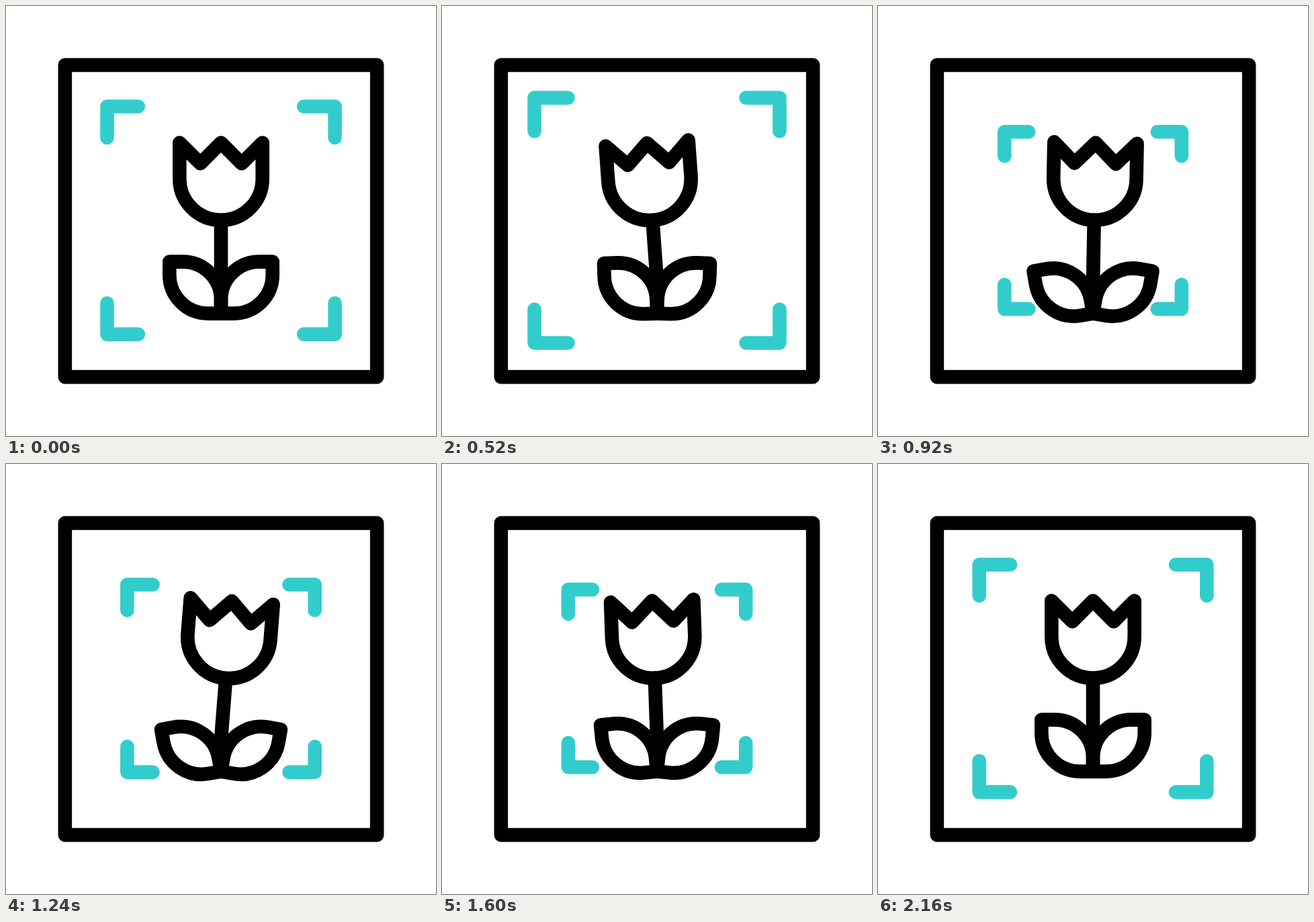
Animation of 640 by 640 pixels, one loop 2.28 s. Source, as an HTML page:

```html
<!DOCTYPE html>
<html lang="en">
<head>
<meta charset="utf-8">
<title>Macro focus</title>
<style>
  html, body { margin: 0; width: 100%; height: 100%; overflow: hidden; background: #fff; }
  svg { display: block; width: 100%; height: 100%; }
  svg * { fill: none; stroke-width: 20.6; stroke-linecap: round; stroke-linejoin: round; }
</style>
</head>
<body>
<svg viewBox="0 0 640 640" stroke="#000">
  <rect x="87.85" y="87.85" width="464.3" height="464.3"/>
  <path id="brackets" stroke="#33cccc"/>
  <!-- The flower is drawn around the foot of its stem. -->
  <g transform="translate(320 457.6)">
    <g id="head">
      <path d="M0-139V-30"/>
      <path d="M-61.7-254.1l30.9 30.9L0-254.1l30.8 30.9 30.9-30.9v53.5a61.7 61.7 0 0 1-123.4 0z"/>
    </g>
    <path class="leaf" d="M76.7-77H57A57 57 0 0 0 0-20V0H19.4A57.3 57.3 0 0 0 76.7-57.3Z"/>
    <g transform="scale(-1 1)">
      <path class="leaf" d="M76.7-77H57A57 57 0 0 0 0-20V0H19.4A57.3 57.3 0 0 0 76.7-57.3Z"/>
    </g>
  </g>
</svg>
<script>
  const LOOP = 2280, STEP = 40, LAST_CHANGE = 2160;

  const brackets = document.getElementById("brackets");
  const head = document.getElementById("head");
  const leaves = document.querySelectorAll(".leaf");

  // Eased progress from 0 to 1 between two times in ms.
  function ease(time, from, to) {
    const u = Math.min(Math.max((time - from) / (to - from), 0), 1);
    return u * u * (3 - 2 * u);
  }

  // Opens a little, snaps shut, hunts for focus, then opens to rest.
  function bracketScale(t) {
    const open = 0.076 * ease(t, 80, 480);
    const shut = 0.326 * ease(t, 560, 810);
    const hunt = 0.1 * ease(t, 810, 1130) - 0.097 * ease(t, 1130, 1450);
    return 1 + open - shut + hunt + 0.247 * ease(t, 1450, 2190);
  }

  // Sways left, right, then slightly left again, in even beats.
  function headAngle(t) {
    const beat = 400, begin = 300, sway = 7.2;
    const swing = n => ease(t, begin + n * beat, begin + (n + 1) * beat);
    return sway * (-swing(0) + 2 * swing(1) - 4 / 3 * swing(2) + swing(3) / 3);
  }

  function leafAngle(t) {
    return 10 * (ease(t, 350, 990) - ease(t, 1300, 1960));
  }

  function bracketPath(scale) {
    const reach = 169.55 * scale, inner = 123.15 * scale;
    let path = "";
    for (const sx of [-1, 1]) {
      for (const sy of [-1, 1]) {
        const x = d => 320 + sx * d, y = d => 319.05 + sy * d;
        path += `M${x(inner)} ${y(reach)}H${x(reach)}V${y(inner)}`;
      }
    }
    return path;
  }

  function draw(now) {
    const time = Math.min(Math.floor((now % LOOP) / STEP) * STEP, LAST_CHANGE);
    brackets.setAttribute("d", bracketPath(bracketScale(time)));
    head.setAttribute("transform", `rotate(${headAngle(time)} 0 -47.6)`);
    for (const leaf of leaves) leaf.setAttribute("transform", `rotate(${leafAngle(time)})`);
  }

  const start = performance.now();
  function tick() {
    draw(performance.now() - start);
    requestAnimationFrame(tick);
  }
  tick();
</script>
</body>
</html>
```
